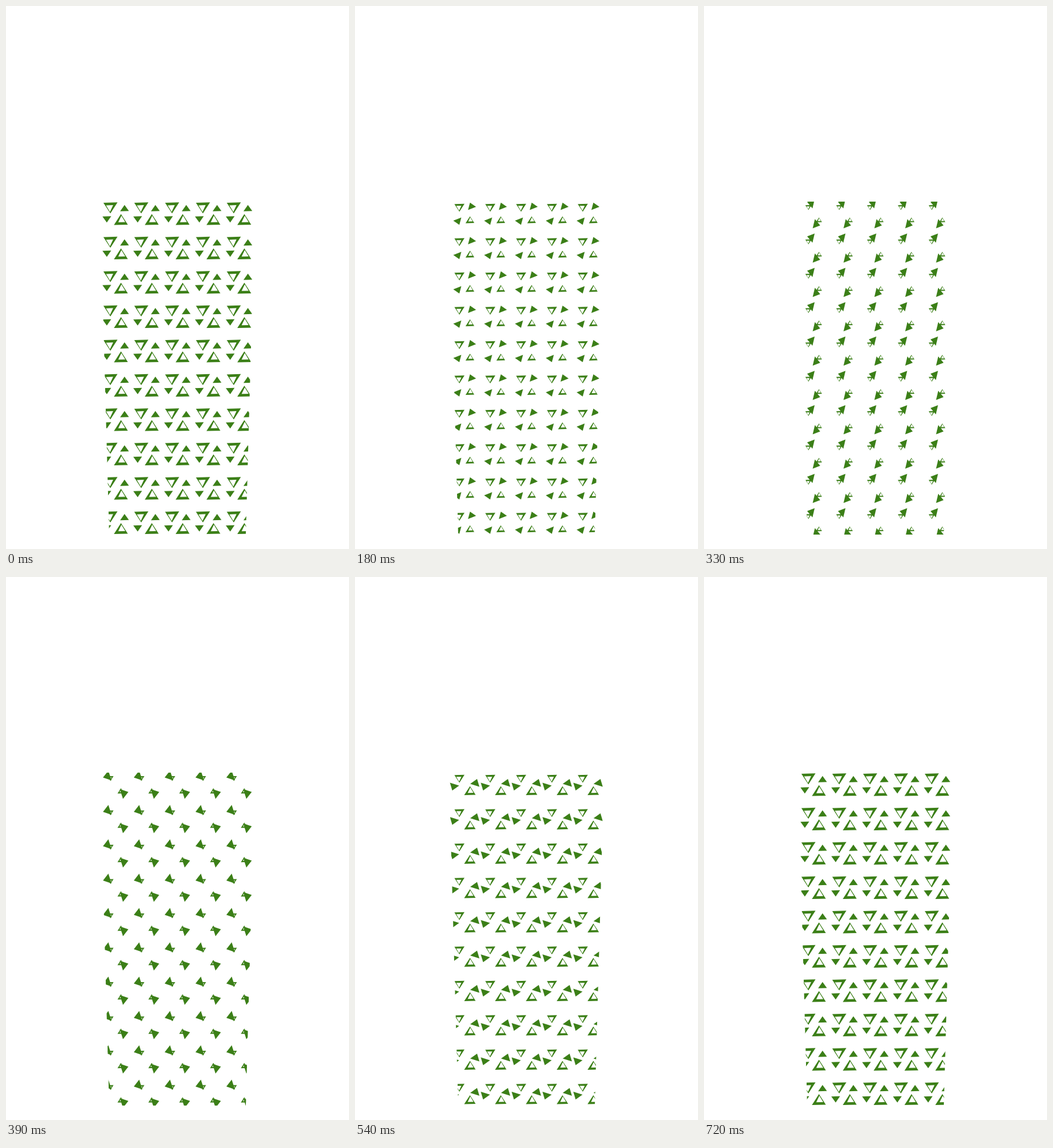
Recreate the animation shown at these times as an HTML page with a canvas. Size 595x941 px, loop 0.75 s.

```html
<!DOCTYPE html>
<html lang="en">
<head>
<meta charset="utf-8">
<title>Turning triangles</title>
<style>
  html, body { margin: 0; height: 100%; overflow: hidden; background: #fff; }
  canvas { display: block; }
</style>
</head>
<body>
<canvas id="stage" width="595" height="941"></canvas>
<script>
const ctx = document.getElementById('stage').getContext('2d');
const LOOP = 750, STEP = 30;
const COLS = 5, ROWS = 10, PITCH_X = 53.5, PITCH_Y = 59.5;
const CENTER = { x: 190.25, y: 360 };
const LEAD = 0.055; // the lower hollow triangle pulses slightly earlier

// Shapes are relative to the centre of a cell, or to the hollow's own pivot.
const solid = new Path2D('M7.75-4.2L22.95-4.8L15.35-15.2Z');
const hollow = new Path2D('M-12.2-7.9L12.3-8.5L-.1 10.8Z M-7.6-3.4L4.7-3.7L-.8 7.9Z');
const pivot = { x: -9.1, y: -11.2 };
const taper = new Path2D('M163 339H432L416 916H179Z');

function ease(p) {
  const half = q => (2 * q) ** 2.2 / 2;
  return p < 0.5 ? half(p) : 1 - half(1 - p);
}

const pulse = p => 1 - 0.285 * (1 - Math.cos(2 * Math.PI * p));

function drawCell(x, y, angle, solidScale, hollowScales) {
  hollowScales.forEach((hollowScale, i) => {
    ctx.save();
    ctx.translate(x, y);
    ctx.rotate(i * Math.PI);

    ctx.save();
    ctx.rotate(-angle);
    ctx.scale(solidScale, solidScale);
    ctx.fill(solid);
    ctx.restore();

    ctx.translate(pivot.x, pivot.y);
    ctx.scale(hollowScale, hollowScale);
    ctx.fill(hollow, 'evenodd');
    ctx.restore();
  });
}

function draw(now) {
  const p = Math.floor(now % LOOP / STEP) * STEP / (LOOP - STEP);
  const angle = Math.PI * ease(p);
  const solidScale = 1 + 0.13 * Math.sin(angle) - 0.09 * Math.sin(2 * angle);
  const hollowScales = [pulse(p), pulse(p + LEAD)];

  ctx.clearRect(0, 0, 595, 941);
  ctx.save();
  ctx.clip(taper);
  ctx.fillStyle = '#3b7f17';
  for (let row = 0; row < ROWS; row++) {
    for (let col = 0; col < COLS; col++) {
      drawCell(CENTER.x + col * PITCH_X, CENTER.y + row * PITCH_Y,
        angle, solidScale, hollowScales);
    }
  }
  ctx.restore();
}

const start = performance.now();
function tick() {
  draw(performance.now() - start);
  requestAnimationFrame(tick);
}
tick();
</script>
</body>
</html>
```
